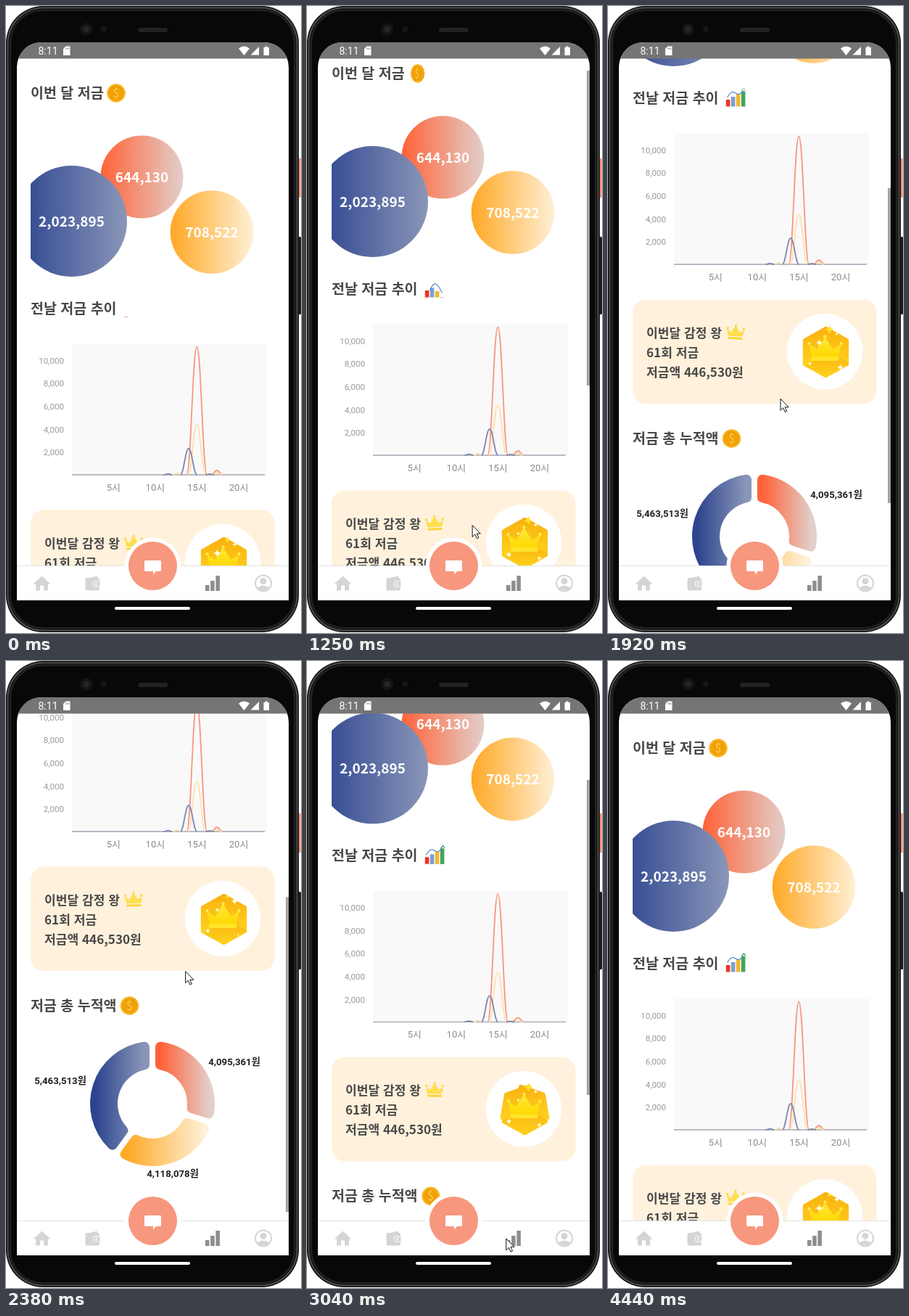
Animation, 407 px wide and 864 px high, one loop 4500 ms. Source, as an HTML page:

```html
<!DOCTYPE html>
<html lang="ko">
<head>
<meta charset="utf-8">
<style>
html, body { margin: 0; width: 100%; height: 100%; overflow: hidden; background: #fff; }
svg { display: block; width: 407px; height: 864px; }
text { font-family: "Noto Sans CJK KR", "Noto Sans CJK JP", "Noto Sans", sans-serif; }
.head { font-size: 19.5px; font-weight: 700; fill: #484848; }
.card { font-size: 17.1px; font-weight: 700; fill: #484848; }
.sum { font-size: 19px; font-weight: 700; fill: #fff; text-anchor: middle; }
.axis, .hour, .part { font-family: Roboto, "Noto Sans CJK KR", sans-serif; }
.axis { font-size: 11.6px; fill: #999; text-anchor: end; }
.hour { font-size: 13px; fill: #8a8a8a; text-anchor: middle; }
.part { font-size: 13.2px; font-weight: 700; fill: #222; text-anchor: middle; }
.clock { font-family: Roboto, sans-serif; font-size: 14px; fill: #fff; }
</style>
</head>
<body>
<svg viewBox="0 0 407 864">
  <defs>
    <linearGradient id="coral"><stop stop-color="#ff6237"/><stop offset="1" stop-color="#e2cfca"/></linearGradient>
    <linearGradient id="navy"><stop stop-color="#2c448f"/><stop offset="1" stop-color="#8a96b8"/></linearGradient>
    <linearGradient id="amber"><stop stop-color="#ffa824"/><stop offset="1" stop-color="#fff0d6"/></linearGradient>
    <linearGradient id="gold" x2="0" y2="1"><stop stop-color="#f9b210"/><stop offset="1" stop-color="#ffd01c"/></linearGradient>
    <linearGradient id="crownFill" x2="0" y2="1"><stop stop-color="#ffe93a"/><stop offset="1" stop-color="#ffd800"/></linearGradient>
    <clipPath id="screen"><path d="M15 819V84A34 34 0 0 1 49 50H356A34 34 0 0 1 390 84V819Z"/></clipPath>
    <clipPath id="view"><rect x="15" y="72" width="375" height="700"/></clipPath>
    <clipPath id="inset"><rect x="34" y="150" width="340" height="240"/></clipPath>
  </defs>

  <rect x="402" y="210" width="4.5" height="54" fill="#f0876b"/>
  <rect x="402" y="318" width="5" height="107" rx="1.5" fill="#1c1c1c"/>
  <rect width="404" height="863" rx="51" fill="#161616"/>
  <rect x="2.5" y="2.5" width="399" height="858" rx="49" fill="none" stroke="#555" stroke-width="1.5"/>
  <rect x="6" y="6" width="392" height="851" rx="45" fill="#080808" stroke="#222" stroke-width="2"/>
  <circle cx="110.5" cy="32" r="8.5" fill="#151515"/>
  <circle cx="110.5" cy="32" r="4" fill="#23262b"/>
  <circle cx="135" cy="32" r="4" fill="#161616"/>
  <rect x="182" y="30" width="41" height="6" rx="3" fill="#222"/>

  <g clip-path="url(#screen)">
    <rect x="15" y="50" width="375" height="769" fill="#fff"/>
    <g clip-path="url(#view)">
      <g id="page"></g>
      <rect id="bar" x="386" width="4" height="434" fill="#a3a3a3"/>
    </g>
    <rect x="15" y="50" width="375" height="22.5" fill="#757575"/>
    <text class="clock" x="44.5" y="67">8:11</text>
    <path d="M82.5 55.5H88.5V68H79V59Z" fill="#fff"/>
    <path d="M82.7 57.5v2.5M84.7 57.5v2.5M86.7 57.5v2.5" stroke="#757575" stroke-width=".8"/>
    <path d="M328.5 68L321 58.5Q328.5 52.5 336 58.5ZM337.5 67.5L349 56V67.5ZM355.5 57H357.5V55.5H360.5V57H363V68H355.5Z" fill="#fff"/>
    <rect x="15" y="772" width="375" height="47" fill="#fff"/>
    <path d="M15 771.5H390" stroke="#e4e4e4"/>
    <circle cx="202.5" cy="771.5" r="39" fill="#fff"/>
    <circle cx="202.5" cy="771.5" r="33.5" fill="#f7977e"/>
    <path d="M192.5 764H212.5Q214 764 214 765.5V777.5Q214 779 212.5 779H207L203 783.5V779H192.5Q191 779 191 777.5V765.5Q191 764 192.5 764Z" fill="#fff"/>
    <g fill="#d5d5d5">
      <path d="M49.5 785.5L61.5 796.5H58V805.5H52V798.5H47V805.5H41V796.5H37.5Z"/>
      <path d="M111 789L126 785.5V788H111Z"/>
      <rect x="109.5" y="788" width="19.5" height="17.5" rx="2.5"/>
      <rect x="120.5" y="793" width="9.5" height="7" rx="1.5" stroke="#fff"/>
      <circle cx="124.5" cy="796.5" r="1.3" fill="#fff"/>
      <circle cx="355" cy="795.5" r="11" fill="none" stroke="#d5d5d5" stroke-width="2"/>
      <circle cx="355" cy="792.5" r="4.5"/>
      <path d="M346.5 802Q355 795 363.5 802Q355 809 346.5 802Z"/>
    </g>
    <path d="M275 798h5.5v8h-5.5zM282.2 792h5.5v14h-5.5zM289.4 785h5.5v21h-5.5z" fill="#8d8d8d"/>
  </g>
  <rect x="150" y="828" width="104" height="4" rx="2" fill="#fff"/>
  <path id="cursor" d="M.5 .5V16.5L4.2 13L6.8 18.8L9.2 17.7L6.7 12H11.7Z" fill="#fff" stroke="#111" stroke-linejoin="round"/>
</svg>

<script>
const LOOP = 4500, STEP = LOOP / 68;
const $ = id => document.getElementById(id);
const all = s => [...document.querySelectorAll(s)];
const clamp = v => Math.max(0, Math.min(1, v));
const smooth = v => (v = clamp(v)) * v * (3 - 2 * v);
const ramp = (t, from, to) => smooth((t - from) / (to - from));
const wave = (t, period, phase = 0) => Math.sin(t * 2 * Math.PI / period + phase);
const text = (kind, x, y, s) => `<text class="${kind}" x="${x}" y="${y}">${s}</text>`;
const disc = (x, y, r, fill) => `<circle cx="${x}" cy="${y}" r="${r}" fill="${fill}"/>`;

// Chart bumps [peak x, half width, height] standing on the zero line
function series(color, bumps) {
  const d = bumps.map(([x, w, h]) => {
    const y = 646 - h, c = w * .42;
    return `M${x - w} 646C${x - w + c} 646 ${x - c} ${y} ${x} ${y}S${x + w - c} 646 ${x + w} 646`;
  }).join('');
  return `<path d="${d}" fill="none" stroke="${color}" stroke-width="1.8"/>`;
}

// Ring sector with parallel gaps and rounded corners
function sector(from, to, fill) {
  const cx = 202, cy = 1021, R = 79, r = 55;
  const at = (rad, deg, side) => {
    const a = deg * Math.PI / 180 + side * Math.asin(11 / rad);
    return `${cx + rad * Math.sin(a)} ${cy - rad * Math.cos(a)}`;
  };
  return `<path d="M${at(R, from, 1)}A${R} ${R} 0 0 1 ${at(R, to, -1)}L${at(r, to, -1)}A${r} ${r} 0 0 0 ${at(r, from, 1)}Z"
    fill="url(#${fill})" stroke="url(#${fill})" stroke-width="14" stroke-linejoin="round"/>`;
}

const coin = (x, y) => `<g class="coin" transform="translate(${x} ${y})">
  <ellipse class="edge" ry="12.5" fill="#d98d00"/>
  <g class="face">${disc(0, 0, 12.5, '#fbb91f')}${disc(0, 0, 10.7, '#f0a008')}
  <text y="5.8" font-size="16" text-anchor="middle" fill="#ffcf4a">$</text></g></g>`;

const hex = i => {
  const a = i * Math.PI / 3;
  return `${33 * Math.sin(a)} ${-32 * Math.cos(a)}`;
};
const gold = 'fill="url(#gold)" stroke="url(#gold)" stroke-width="6" stroke-linejoin="round"';
const badge = `<path id="plate" d="M${[0, 1, 2, 3, 4, 5].map(hex).join('L')}Z" ${gold}/>` +
  [0, 2, 4].map(i => `<path class="rhomb" d="M0 0L${hex(i)}L${hex(i + 1)}L${hex(i + 2)}Z" ${gold}/>`).join('');
const tips = (dx, y, r, fill) => disc(-dx, y, r, fill) + disc(0, y * 1.8, r, fill) + disc(dx, y, r, fill);

const stars = [[5, -31, 7], [-9, -13, 5.5], [15, -25, 5], [-22, 16, 4.5], [20, 21, 4.5]];
const starPath = 'M0 -1Q.15 -.15 1 0Q.15 .15 0 1Q-.15 .15 -1 0Q-.15 -.15 0 -1Z';
const barColors = ['#ea3323', '#7c9ed0', '#f2b632', '#41a45b'];

$('page').innerHTML =
  text('head', 34, 127, '이번 달 저금') + coin(152, 120) +
  `<g clip-path="url(#inset)">${disc(187.5, 235.5, 57, 'url(#coral)')}${disc(90.5, 296.5, 76.5, 'url(#navy)')}${disc(284, 311.5, 57.3, 'url(#amber)')}</g>` +
  text('sum', 187.5, 242.5, '644,130') + text('sum', 90.5, 303.5, '2,023,895') + text('sum', 284, 318.5, '708,522') +
  text('head', 34, 424, '전날 저금 추이') +
  barColors.map((c, i) => `<rect class="col" x="${162.8 + i * 7}" width="5.6" fill="${c}"/>`).join('') +
  '<path d="M162.5 428.3H168.5" stroke="#e9a48c"/><path id="trend" fill="none" stroke="#4a80c8" stroke-width="1.1"/>' +
  '<path id="arrow" d="M184.5 406.5L187.5 403L190 406.5" fill="none" stroke="#41a45b" stroke-width="1.3"/>' +
  '<rect x="91" y="465.5" width="269" height="181" fill="#f9f9f9"/>' +
  [2, 4, 6, 8, 10].map(k => text('axis', 80, 619.2 - (k - 2) * 15.8, k + ',000')).join('') +
  [5, 10, 15, 20].map(h => text('hour', 90.7 + h * 11.52, 668, h + '시')).join('') +
  '<path d="M91 646H357" stroke="#a3a5b4" stroke-width="1.3"/>' +
  series('#f7977e', [[263.3, 14, 176.5], [291, 8, 6]]) +
  series('#ffe0ae', [[236, 6, 2], [263.3, 12, 69], [291, 7, 3]]) +
  series('#8088af', [[223.5, 6, 1.3], [252, 11.5, 36], [281, 6, 1]]) +
  '<rect x="34" y="694.5" width="336.5" height="143.5" rx="18" fill="#fff1dc"/>' +
  ['이번달 감정 왕', '61회 저금', '저금액 446,530원'].map((s, i) => text('card', 53, 746.5 + i * 27, s)).join('') +
  `<g id="crown"><path d="M-10 6L-12 -4L-6 1L0 -9L6 1L12 -4L10 6Z" fill="#ffdf4d"/>
   <rect x="-10" y="7.5" width="20" height="2.8" rx="1" fill="#ffd22e"/>${tips(11.2, -4.7, 1.7, '#ffd93b')}</g>` +
  disc(299, 766, 52.3, '#fff') +
  `<g transform="translate(300.5 767)">${badge}
   <g transform="translate(-1 0)"><path d="M-18 6L-22 -11L-11 -4L0 -21L11 -4L22 -11L18 6Z" fill="url(#crownFill)"/>
   <rect x="-19" y="6" width="38" height="6" rx="1.5" fill="#ffe428"/>${tips(22, -12, 2.2, '#ffe84a')}</g>
   ${stars.map((s, i) => `<path class="star" d="${starPath}" fill="${i ? '#fffbe0' : '#ffdf2e'}"/>`).join('')}</g>` +
  text('head', 34, 893, '저금 총 누적액') + coin(170.5, 886) +
  sector(0, 107.8, 'coral') + sector(107.8, 216.2, 'amber') + sector(216.2, 360, 'navy') +
  text('part', 75, 994, '5,463,513원') + text('part', 315, 968, '4,095,361원') + text('part', 230, 1122, '4,118,078원');

const cols = all('.col'), faces = all('.face'), edges = all('.edge'), rhombs = all('.rhomb'), sparks = all('.star');

// Three drags; the pointer moves by the same amounts while it is pressed
const scroll = t => 290 * ramp(t, 1160, 1677) + 121 * ramp(t, 1950, 2340) - 411 * ramp(t, 2700, 3280);
const stops = [[400, 328, 94], [860, 230, 547], [960, 230, 547], [1160, 228, 742], [1677, 224, 452],
  [1950, 238, 544], [2340, 247, 423], [2700, 250, 533], [3280, 288, 944], [3510, 311, 337], [3900, 324, -25]];

function pointer(t) {
  const i = Math.max(1, stops.findIndex(s => s[0] > t));
  const [t0, x0, y0] = stops[i - 1], [t1, x1, y1] = stops[i];
  const p = ramp(t, t0, t1);
  return [x0 + (x1 - x0) * p, y0 + (y1 - y0) * p];
}

// A falling arc that settles into a rising wave
function trend(t) {
  const grow = ramp(t, 300, 800), settle = ramp(t, 1000, 2000);
  const points = [];
  for (let u = 0; u <= 1; u += .05) {
    const arc = 428 - 18 * grow * Math.sin(Math.PI * (.15 + .85 * u));
    const rise = 416 - 12 * u - 4 * wave(u, 1);
    points.push(`${164.5 + 23 * u + 6 * (1 - u) * (1 - settle)} ${arc + (rise - arc) * settle}`);
  }
  return 'M' + points.join('L');
}

function draw(t) {
  const y = scroll(t);
  $('page').setAttribute('transform', `translate(0 ${-y})`);
  $('bar').setAttribute('y', 72.5 + y * .615);
  $('bar').setAttribute('opacity', t < 1160 ? 0 : 1 - ramp(t, 3740, 3990));

  $('cursor').setAttribute('transform', `translate(${pointer(t)})`);
  $('cursor').setAttribute('visibility', t < 400 || t > 3900 ? 'hidden' : 'visible');

  // Half turn of the coins, then a rest
  const turn = ramp(t % 1900, 1000, 1800) * Math.PI;
  const w = Math.max(.04, Math.abs(Math.cos(turn)));
  faces.forEach(f => f.setAttribute('transform', `scale(${w} 1)`));
  edges.forEach(e => {
    e.setAttribute('rx', 12.5 * w);
    e.setAttribute('cx', 1.5 * Math.sin(turn));
  });

  cols.forEach((c, i) => {
    const h = (9.5 + 4 * i) * ramp(t, 200 + 330 * i, 1000 + 330 * i);
    c.setAttribute('y', 428.5 - h);
    c.setAttribute('height', h);
  });
  $('trend').setAttribute('d', trend(t));
  $('trend').setAttribute('opacity', ramp(t, 300, 400));
  $('arrow').setAttribute('opacity', ramp(t, 1850, 2000));

  $('crown').setAttribute('transform', `translate(176 739) rotate(${3 * wave(t, 1500)})`);

  const split = ramp(t, 2800, 3040) * (1 - ramp(t, 3500, 3850));
  $('plate').setAttribute('opacity', 1 - clamp(split * 3));
  rhombs.forEach((r, i) => r.setAttribute('transform', `rotate(${10 * split * (i - 1)})`));
  sparks.forEach((s, i) => {
    const [sx, sy, size] = stars[i];
    s.setAttribute('transform', `translate(${sx} ${sy}) scale(${size * (.7 + .3 * wave(t, 900, i * 1.7))})`);
  });
}

const start = performance.now();
function tick() {
  const t = (performance.now() - start) % LOOP;
  draw(Math.floor((t + 8) / STEP) * STEP % LOOP);
  requestAnimationFrame(tick);
}
tick();
</script>
</body>
</html>
```
